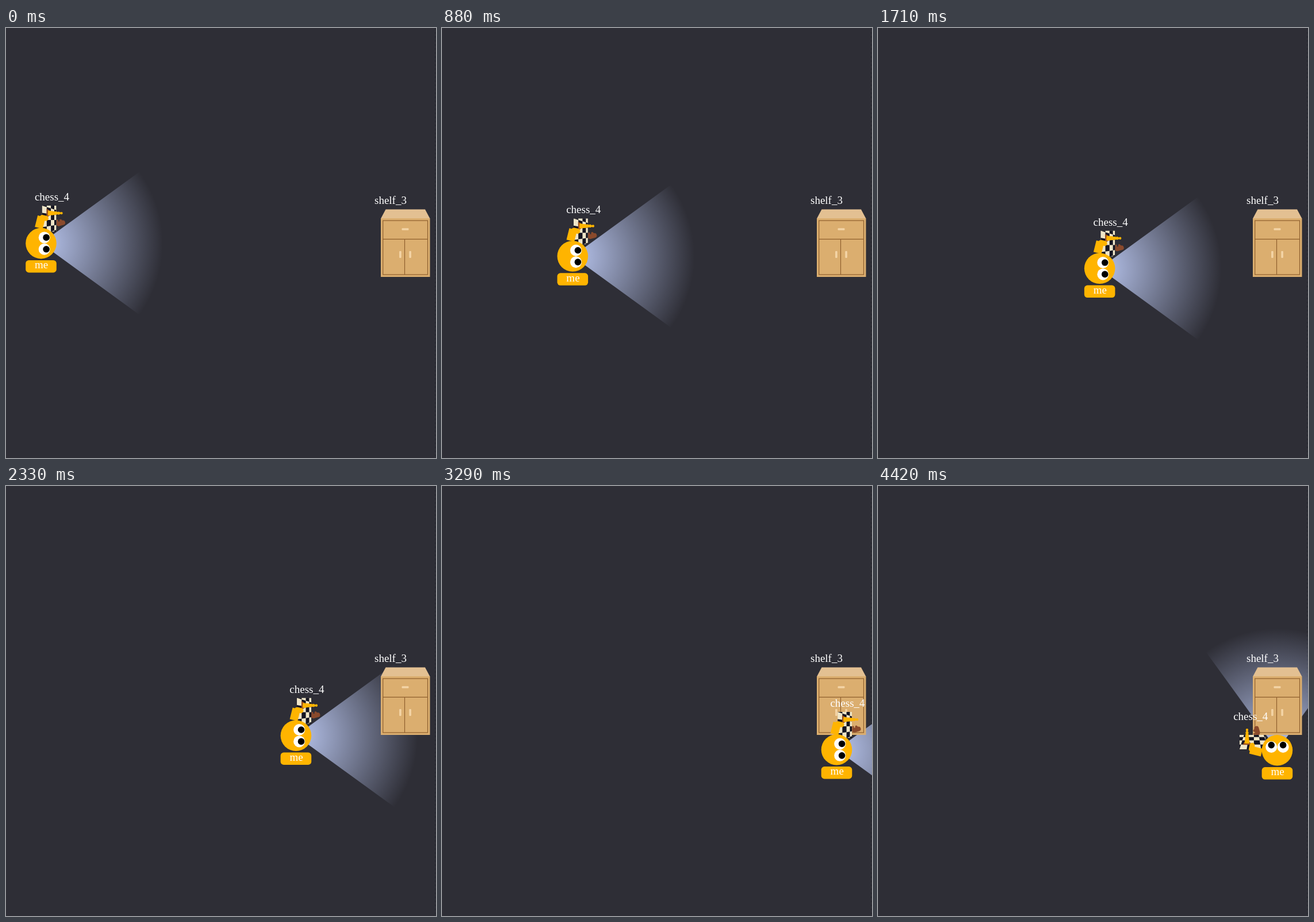
An HTML page with a canvas that plays this animation: 748x748 px, repeating every 4710 ms.

```html
<!DOCTYPE html>
<html lang="en">
<head>
<meta charset="utf-8">
<style>
  html, body { margin: 0; width: 100%; height: 100%; overflow: hidden; background: #2e2e36; }
  canvas { display: block; }
</style>
</head>
<body>
<canvas id="stage" width="748" height="748"></canvas>
<script>
const ctx = document.getElementById('stage').getContext('2d');
const LOOP = 4710, FRAMES = 113, STEP = LOOP / FRAMES;
const WALK = 80, TURN_START = 80.3, TURN_RATE = 3.5;
const YELLOW = '#ffb400', BROWN = '#8a4a2c', WOOD_LINE = '#8f5f2e', HANDLE = '#f3d4a6';

function rect(color, x, y, w, h, r = 0) {
  ctx.fillStyle = color;
  ctx.beginPath();
  ctx.roundRect(x, y, w, h, r);
  ctx.fill();
}

function disc(color, x, y, r) {
  ctx.fillStyle = color;
  ctx.beginPath();
  ctx.arc(x, y, r, 0, 2 * Math.PI);
  ctx.fill();
}

function line(color, width, x1, y1, x2, y2, cap = 'butt') {
  ctx.strokeStyle = color;
  ctx.lineWidth = width;
  ctx.lineCap = cap;
  ctx.beginPath();
  ctx.moveTo(x1, y1);
  ctx.lineTo(x2, y2);
  ctx.stroke();
}

// Trapezoid with level top and bottom edges.
function slab(color, top, topLeft, topRight, bottom, left, right) {
  ctx.fillStyle = color;
  ctx.beginPath();
  ctx.moveTo(topLeft, top);
  ctx.lineTo(topRight, top);
  ctx.lineTo(right, bottom);
  ctx.lineTo(left, bottom);
  ctx.fill();
}

function label(text, x, y, align = 'left') {
  ctx.font = '19px "Liberation Serif", "Times New Roman", serif';
  ctx.textAlign = align;
  ctx.fillStyle = '#fff';
  ctx.fillText(text, x, y);
}

function drawCone() {
  const radius = 212, half = Math.PI / 5, up = -Math.PI / 2;
  const light = ctx.createRadialGradient(0, 0, 0, 0, 0, radius);
  light.addColorStop(0, 'rgba(184,197,238,1)');
  light.addColorStop(1, 'rgba(184,197,238,0)');
  ctx.fillStyle = light;
  ctx.beginPath();
  ctx.moveTo(0, 0);
  ctx.arc(0, 0, radius, up - half, up + half);
  ctx.fill();
}

function drawShelf() {
  const left = 652, right = 737.5, middle = 693.5;
  slab('#e3c092', 315.5, left + 8.5, right - 8.5, 331.5, left, right);
  rect('#dbae6f', left, 331, right - left, 102);
  ctx.strokeStyle = WOOD_LINE;
  ctx.lineWidth = 1.2;
  ctx.strokeRect(left + 3.7, 335, right - left - 7.7, 94);
  line(WOOD_LINE, 1.2, left + 3.7, 367.3, right - 4, 367.3);
  line(WOOD_LINE, 1.2, middle, 367, middle, 429);
  rect(HANDLE, 688.5, 348.3, 12, 3.4, 1.2);
  for (const side of [-1, 1]) rect(HANDLE, middle - 0.8 + side * 8.6, 388, 3.6, 12, 1.2);
  label('shelf_3', left - 11, 306);
}

// The figure and its chess set are drawn as if facing up.
function drawBoard() {
  const left = -65.6, bottom = -1.6, width = 45, depth = 25;
  const rowY = r => bottom - depth * (1 - (1 - r / 4) ** 1.4);
  const edgeX = (k, r) => -40.6 + k * 12.5 * (1 - (bottom - rowY(r)) / 80);
  ctx.save();
  ctx.beginPath();
  ctx.rect(left, bottom - depth, width, depth);
  ctx.clip();
  rect('#f0e6c8', left, bottom - depth, width, depth);
  for (let r = 0; r < 4; r++) {
    for (let k = -4; k < 4; k++) {
      if ((r + k) & 1) {
        slab('#141420', rowY(r + 1), edgeX(k, r + 1), edgeX(k + 1, r + 1), rowY(r), edgeX(k, r), edgeX(k + 1, r));
      }
    }
  }
  ctx.restore();
}

function drawPieces() {
  const kingX = -52.5;
  slab('#9c501c', -15, kingX - 4.5, kingX + 4.5, -9.5, kingX - 7.5, kingX + 7.5);
  slab(YELLOW, -36, kingX - 1, kingX + 1, -12, kingX - 4.5, kingX + 4.5);
  for (let i = 0; i < 5; i++) disc(YELLOW, kingX, -35.5 + 5 * i, 2.2 + 0.4 * i);

  line(BROWN, 8, -34, -31, -36, -38, 'round');
  line(BROWN, 4, -36, -38, -40, -34, 'round');
  line(BROWN, 3, -40, -28.5, -32, -28.5, 'round');
}

function drawHand() {
  line(YELLOW, 14, -27, 4, -47, -1);
  line(YELLOW, 9, -45, -2, -43.5, -8.5, 'round');
}

function drawFigure() {
  drawBoard();
  drawPieces();
  drawHand();
  disc(YELLOW, 0, 0, 26.8);
  for (const side of [-1, 1]) {
    disc('#fff', side * 10.2, -5.7, 10);
    disc('#000', side * 10.2, -9.1, 5.8);
  }
}

function draw(time) {
  const n = Math.floor((time % LOOP + 5) / STEP);
  const steps = Math.min(n, WALK);
  const x = 61 + steps * 7.918, y = 374.6 + steps * 1.064;
  const turned = Math.min(90, Math.max(0, n - TURN_START) * TURN_RATE);
  const angle = (90 - turned) * Math.PI / 180;
  const posed = part => {
    ctx.save();
    ctx.translate(x, y);
    ctx.rotate(angle);
    part();
    ctx.restore();
  };

  rect('#2e2e36', 0, 0, 748, 748);
  ctx.setLineDash([3, 4]);
  line('#22242c', 1, 746.5, 0, 746.5, 748);
  ctx.setLineDash([]);

  posed(drawCone);
  drawShelf();
  posed(drawFigure);
  rect(YELLOW, x - 26.8, y + 29.4, 53.6, 21.4, 5.5);
  label('me', x + 0.7, y + 43.6, 'center');

  // The caption follows the set but stays upright.
  const chessX = x - 43.6 * Math.cos(angle) + 21.6 * Math.sin(angle);
  const chessY = y - 43.6 * Math.sin(angle) - 21.6 * Math.cos(angle);
  label('chess_4', chessX - 32.7, chessY - 30.9);
}

const start = performance.now();
function tick() {
  draw(performance.now() - start);
  requestAnimationFrame(tick);
}
tick();
</script>
</body>
</html>
```
